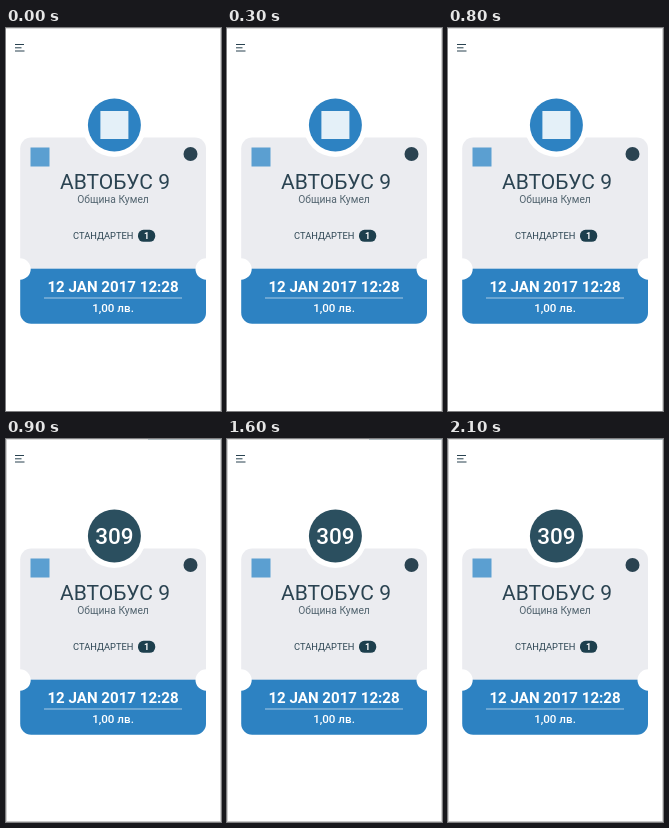
Write an HTML page with a canvas that moves like this. It is 215 px wide and 383 px high and loops after 2200 ms.

```html
<!DOCTYPE html>
<html lang="bg">
<head>
<meta charset="utf-8">
<title>Билет</title>
<style>
html, body { margin: 0; width: 100%; height: 100%; overflow: hidden; background: #fff; }
canvas { display: block; width: 215px; height: 383px; }
</style>
</head>
<body>
<canvas id="stage"></canvas>
<script>
const W = 215, H = 383, LOOP = 2200, SWAP = 900;
const BLUE = '#2d82c2', DARK = '#2b4f5f', INK = '#2a4351', PANEL = '#ebecf0';
const canvas = document.getElementById('stage');
const ctx = canvas.getContext('2d');
const ratio = window.devicePixelRatio || 1;
canvas.width = Math.round(W * ratio);
canvas.height = Math.round(H * ratio);
ctx.scale(ratio, ratio);

function rect(x, y, w, h, color) {
  ctx.fillStyle = color;
  ctx.fillRect(x, y, w, h);
}

function disc(x, y, r, color) {
  ctx.fillStyle = color;
  ctx.beginPath();
  ctx.arc(x, y, r, 0, Math.PI * 2);
  ctx.fill();
}

function rounded(x, y, w, h, r) {
  ctx.beginPath();
  ctx.roundRect(x, y, w, h, r);
}

function label(str, x, y, size, weight, color) {
  ctx.font = `${weight} ${size}px Roboto, Inter, sans-serif`;
  ctx.textAlign = 'center';
  ctx.fillStyle = color;
  ctx.fillText(str, x, y);
}

function menu() {
  rect(9, 16, 9, 1, INK);
  rect(9, 19.3, 6.5, 1, INK);
  rect(9, 22.5, 9.5, 1, INK);
}

function card() {
  ctx.save();
  rounded(14.2, 109.6, 185.8, 186.2, 11);
  ctx.clip();
  rect(14, 109, 187, 132, PANEL);
  rect(14, 240.7, 187, 56, BLUE);
  ctx.restore();
  disc(14, 241, 10.7, '#fff');
  disc(200.2, 241, 10.7, '#fff');
  disc(108.3, 97, 32, '#fff');
}

function details() {
  rect(24.5, 119.5, 19, 19, '#5b9fd1');
  disc(184.5, 126, 7, INK);
  label('АВТОБУС 9', 109, 161.2, 21, 400, INK);
  label('Община Кумел', 107, 174.8, 10.3, 400, '#52646f');
  label('СТАНДАРТЕН', 97.2, 211, 9.3, 400, INK);
  ctx.fillStyle = '#1d3f4d';
  rounded(132, 201.8, 17.2, 12, 5.5);
  ctx.fill();
  label('1', 140.5, 211, 9, 700, '#fff');
  label('12 JAN 2017 12:28', 107, 263.7, 15.1, 700, '#fff');
  rect(38, 269.5, 138, 1, '#a9cbe5');
  label('1,00 лв.', 107, 284, 11.6, 500, '#fff');
}

function badge(showNumber) {
  disc(108.4, 97.1, 26.5, showNumber ? DARK : BLUE);
  if (showNumber) label('309', 108.4, 104.7, 22.5, 500, '#fff');
  else rect(94.4, 83, 28, 28, '#e4f0f8');
}

function edges(showNumber) {
  rect(0, 0, W, 1, '#dcdcdc');
  rect(W - 1, 0, 1, H, '#d2d2d2');
  if (showNumber) {
    rect(142, 0, 73, 1, '#b0bcc0');
    rect(0, 0, 1, H, '#cfcfcf');
    rect(0, H - 1, W, 1, '#c8c8c8');
  }
}

function draw(now) {
  const showNumber = now % LOOP >= SWAP;
  rect(0, 0, W, H, '#fff');
  edges(showNumber);
  menu();
  card();
  details();
  badge(showNumber);
  requestAnimationFrame(draw);
}

draw(0);
</script>
</body>
</html>
```
